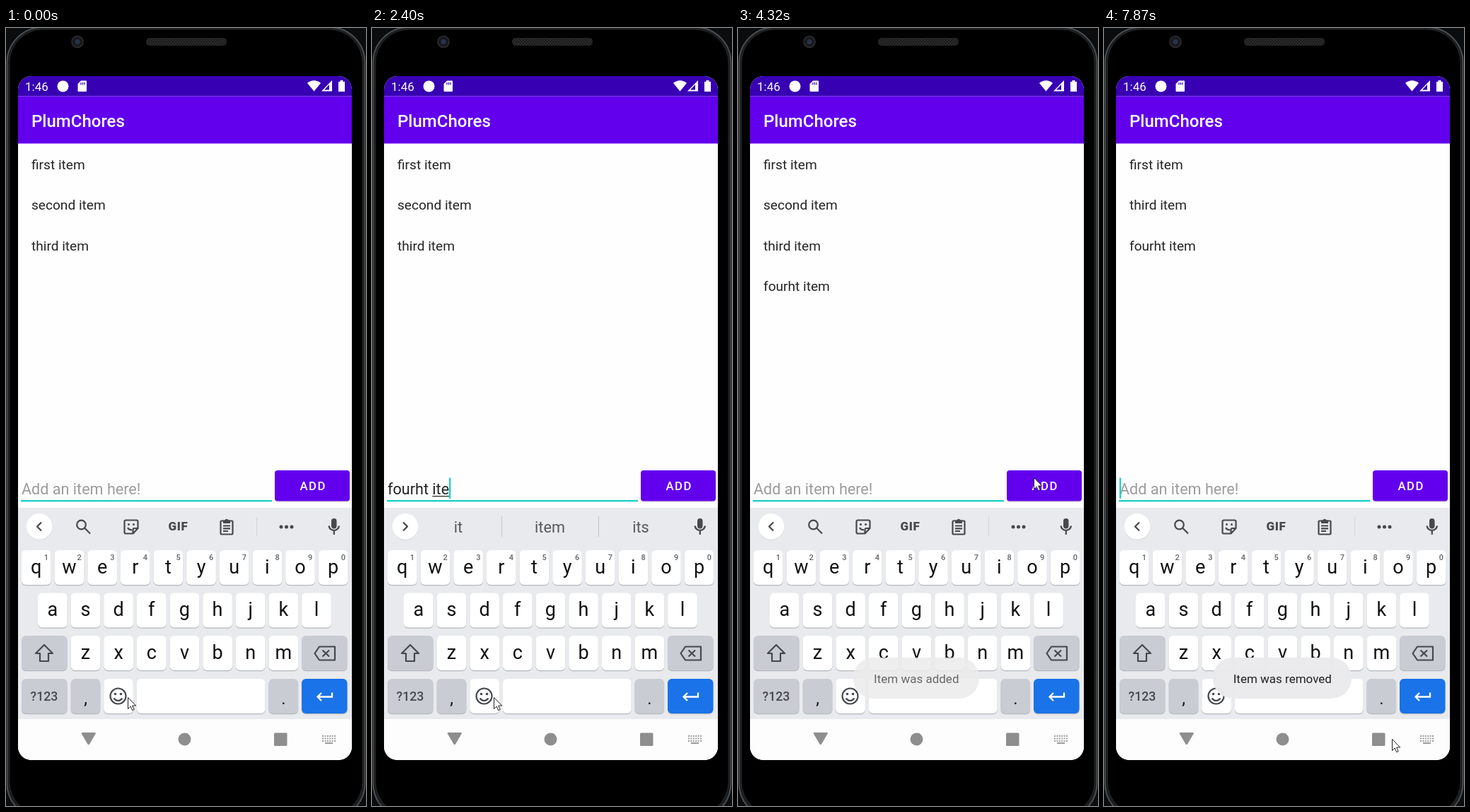
Recreate the animation shown at these times as an HTML page. Size 509 by 1101 pixels, loop 8 s.

```html
<!DOCTYPE html>
<html lang="en">
<head>
<meta charset="utf-8">
<title>To-do list</title>
<style>
  html, body { margin: 0; width: 100%; height: 100%; overflow: hidden; background: #000; }
  svg { display: block; width: 509px; height: 1101px; }
  text { font-family: Roboto, "Noto Sans", sans-serif; white-space: pre; }
  .mid { text-anchor: middle; }
  .row { font-size: 19.1px; fill: #242424; }
  .field { font-size: 21.6px; fill: #242424; }
  .hint { font-size: 21.6px; fill: #9c9c9c; }
  .key { font-size: 27px; fill: #111; }
  .sup { font-size: 11px; font-weight: 500; fill: #62656a; }
  .sug { font-size: 21.7px; fill: #55585c; }
  .msg { font-size: 17px; fill: #202124; }
  .line { fill: none; stroke: #45484c; stroke-width: 2.2; stroke-linejoin: round; }
  .solid { fill: #45484c; }
  .nav { fill: #8e8e8e; }
</style>
</head>
<body>
<svg viewBox="0 0 509 1101" xmlns="http://www.w3.org/2000/svg">
  <defs>
    <clipPath id="screen"><rect x="17" y="68" width="472" height="968" rx="19"/></clipPath>
    <pattern id="mesh" width="4" height="4" patternUnits="userSpaceOnUse">
      <rect width="4" height="4" fill="#2b2b2b"/><path d="M0 0L4 4M4 0L0 4" stroke="#1c1c1c"/>
    </pattern>
  </defs>

  <!-- phone body -->
  <rect width="509" height="1101" fill="#0b0c0d"/>
  <rect x="1.5" y="-1" width="506" height="1120" rx="50" fill="#1b1d1f" stroke="#4a4d50" stroke-width="2"/>
  <rect x="5" y="2" width="499" height="1112" rx="47" fill="#000" stroke="#26282a"/>
  <circle cx="101" cy="19.500" r="8" fill="#17191c" stroke="#2e3033" stroke-width="1.500"/>
  <circle cx="101" cy="19.500" r="3.500" fill="#26324c"/>
  <rect x="198" y="14" width="114" height="11" rx="5" fill="url(#mesh)"/>

  <g clip-path="url(#screen)">
    <rect x="17" y="68" width="472" height="968" fill="#fefefe"/>
    <rect x="17" y="68" width="472" height="28.500" fill="#3700b3"/>
    <rect x="17" y="96.500" width="472" height="67" fill="#6200ee"/>

    <!-- status bar -->
    <g fill="#fff">
      <text x="27" y="88.500" font-size="17">1:46</text>
      <circle cx="80.500" cy="82.500" r="8"/>
      <path d="M106 74.500H113Q114 74.500 114 75.500V89Q114 90 113 90H102.500Q101.500 90 101.500 89V79Z"/>
      <path d="M426 78Q435.500 70.500 445 78L435.500 89.500Z"/>
      <path d="M461 74V89.500H446Z"/>
      <path d="M472.500 74H476.500V76H479V90H470V76H472.500Z"/>
    </g>
    <path d="M106 77V80.500M108.500 77V80.500M111 77V80.500" stroke="#3700b3" stroke-width="1.200"/>
    <path d="M457 80V87.500H450Z" fill="#3700b3"/>
    <text x="36" y="139.500" font-size="24" font-weight="500" fill="#fff">PlumChores</text>

    <g id="rows"></g>

    <!-- entry field -->
    <text id="hint" class="hint" x="22" y="660">Add an item here!</text>
    <text id="field" class="field" x="22" y="660"></text>
    <rect id="under" y="662" height="1.200" fill="#242424"/>
    <rect x="21" y="668" width="355" height="2.400" fill="#1fd2c4"/>
    <rect id="caret" y="636.500" width="2.400" height="29.500" fill="#1fd2c4"/>
    <rect x="380" y="627.500" width="106" height="43.500" rx="4" fill="#bbb" opacity=".5"/>
    <rect x="380" y="626" width="106" height="43.500" rx="4" fill="#6200ee"/>
    <text x="415.500" y="654" font-size="16.700" font-weight="500" letter-spacing="1.500" fill="#fff">ADD</text>

    <!-- keyboard -->
    <rect x="17" y="679" width="472" height="299" fill="#e8eaed"/>
    <circle cx="47" cy="706.500" r="18.300" fill="#c9cbcf" opacity=".6"/>
    <circle cx="47" cy="705.500" r="18.300" fill="#fff"/>
    <path id="chevron" class="line"/>

    <g id="tools">
      <circle class="line" cx="106.500" cy="703" r="6.300"/>
      <path class="line" d="M111 707.500L119 715.500" stroke-width="3"/>
      <path class="line" d="M169.500 696.500H184.500Q186.500 696.500 186.500 698.500V708L179.500 715.500H169.500Q167.500 715.500 167.500 713.500V698.500Q167.500 696.500 169.500 696.500ZM186 708H181.500Q179.500 708 179.500 710V715M172 707Q174 711 178 710"/>
      <circle class="solid" cx="173.500" cy="702.500" r="1.500"/>
      <circle class="solid" cx="180.500" cy="702.500" r="1.500"/>
      <text class="mid solid" x="243.500" y="711" font-size="17" font-weight="900" letter-spacing=".600">GIF</text>
      <path class="line" d="M304.500 697.500H319.500Q320.500 697.500 320.500 698.500V715.500Q320.500 716.500 319.500 716.500H304.500Q303.500 716.500 303.500 715.500V698.500Q303.500 697.500 304.500 697.500ZM307 704.500H317M307 708.300H317M307 712H314"/>
      <path class="solid" d="M307 696.500H309.500A2.700 2.700 0 0 1 314.500 696.500H317V701H307Z"/>
      <path d="M354.500 692V719" stroke="#d2d4d8"/>
      <circle class="solid" cx="389" cy="706" r="2.500"/>
      <circle class="solid" cx="396.500" cy="706" r="2.500"/>
      <circle class="solid" cx="404" cy="706" r="2.500"/>
    </g>
    <g id="sugs">
      <text class="sug mid" x="122" y="714"></text>
      <text class="sug mid" x="251.500" y="714"></text>
      <text class="sug mid" x="380" y="714"></text>
      <path d="M183.500 691V720M320.500 691V720" stroke="#c6c8cc"/>
    </g>
    <rect class="solid" x="460" y="694" width="7.500" height="14.500" rx="3.700"/>
    <path class="line" d="M456.500 704.500A7.300 7.300 0 0 0 471 704.500M463.800 712V717"/>

    <g id="keys"></g>
    <path class="line" d="M54 873L66 885H60V896H48V885H42Z"/>
    <path class="line" d="M443 875.500H465V894.500H443L436.500 885ZM447.500 880.500L457 889.500M457 880.500L447.500 889.500"/>
    <circle class="line" cx="158.500" cy="945.500" r="11"/>
    <circle class="solid" cx="154.500" cy="942.500" r="1.800"/>
    <circle class="solid" cx="162.500" cy="942.500" r="1.800"/>
    <path class="line" d="M152.500 948.500Q158.500 955.500 164.500 948.500"/>
    <path d="M461 940.500V946.500H441M446 941L440.500 946.500L446 952" fill="none" stroke="#fff" stroke-width="2.300"/>

    <!-- navigation bar -->
    <rect x="17" y="978" width="472" height="58" fill="#fdfdfd"/>
    <path class="nav" d="M107.500 997H126Q127.500 997.500 126.500 999L118 1013.500Q116.700 1015 115.500 1013.500L107 999Q106 997.500 107.500 997Z"/>
    <circle class="nav" cx="252.500" cy="1006.500" r="9"/>
    <rect class="nav" x="379" y="997.500" width="18.500" height="18.500" rx="1.500"/>
    <path d="M447 1002H466M447 1005.500H466M447 1009H466" stroke="#9b9b9b" stroke-width="2" stroke-dasharray="2 1.400"/>
    <path d="M451 1012H462" stroke="#9b9b9b" stroke-width="1.800"/>

    <g id="toast">
      <rect y="891" height="58" rx="28" fill="#ebebed"/>
      <text class="msg mid" x="252.300" y="926.500"></text>
    </g>
  </g>
  <path id="mouse" d="M.5 .5V16.500L4.200 13L6.700 18.700L9.200 17.600L6.700 12H11.700Z" fill="#fff" stroke="#222" stroke-width="1"/>
</svg>

<script>
const LOOP = 8000;
const $ = id => document.getElementById(id);
const clamp = v => Math.max(0, Math.min(1, v));
const ramp = (t, from, to) => clamp((t - from) / (to - from));
const ease = p => p * p * (3 - 2 * p);

function add(parent, tag, attrs, content = "") {
  const el = document.createElementNS("http://www.w3.org/2000/svg", tag);
  for (const name in attrs) el.setAttribute(name, attrs[name]);
  el.textContent = content;
  parent.append(el);
  return el;
}
const set = (el, name, value) => el.setAttribute(name, value);
const show = (el, on) => set(el, "visibility", on ? "visible" : "hidden");

// Keyboard
const PITCH = 46.65, GREY = "#c9ccd3";
function key(x, y, w, fill = "#fff") {
  add($("keys"), "rect", { x, y: y + 1.3, width: w, height: 49, rx: 6, fill: "#b5b8bd" });
  add($("keys"), "rect", { x, y, width: w, height: 49, rx: 6, fill });
}
const label = (x, y, cls, s) => add($("keys"), "text", { x, y, class: cls }, s);
[["qwertyuiop", 22, 739], ["asdfghjkl", 45, 799.5], ["zxcvbnm", 91.7, 860]].forEach(([letters, x0, y]) => {
  [...letters].forEach((c, i) => {
    const x = x0 + i * PITCH;
    key(x, y, 41.6);
    label(x + 20.8, y + 32.5, "key mid", c);
    if (y === 739) label(x + 35, y + 13.5, "sup mid", (i + 1) % 10);
  });
});
key(22, 860, 64.5, GREY);
key(418, 860, 64.5, GREY);
key(22, 921, 64.5, GREY);
key(91.7, 921, 41.6, GREY);
key(138.3, 921, 41.6);
key(185, 921, 181.5);
key(371.5, 921, 41.6, GREY);
key(418, 921, 64.5, "#1a73e8");
set(label(54, 952, "mid solid", "?123"), "style", "font-size:17.7px;font-weight:500");
label(112.5, 957, "key mid", ",").style.fontSize = "24px";
label(392.3, 957, "key mid", ".").style.fontSize = "24px";

// List
const ROW = 57.5;
const rows = ["first item", "second item", "third item", "fourht item"].map((s, i) =>
  add($("rows"), "text", { class: "row", x: 36, y: 199.5 + i * ROW }, s));

// Bursts of activity: start, end, number of picture changes
const bursts = [
  [120, 390, 3], [700, 1700, 8], [2130, 2670, 5], [2940, 3480, 5],
  [3750, 4740, 8], [4860, 5870, 9], [6020, 7000, 8], [7240, 7870, 5]
];
function snap(t) {
  const burst = bursts.filter(b => b[0] <= t).pop();
  if (!burst) return 0;
  const [start, end, n] = burst, step = (end - start) / (n - 1);
  return start + step * Math.min(n - 1, Math.floor((t - start) / step + 0.01));
}

// time, text, word being composed
const typing = [
  [0, "", ""], [120, "f", "f"], [380, "fo", "fo"], [700, "fou", "fou"], [830, "four", "four"],
  [1110, "fourh", "fourh"], [1260, "fourht", "fourht"], [1400, "fourht ", "fourht"],
  [1690, "fourht ", ""], [2130, "fourht i", "i"], [2260, "fourht it", "it"],
  [2390, "fourht ite", "ite"], [2530, "fourht item", "item"], [3750, "", ""]
];
const hints = [
  [0, ""], [250, "f|for|from"], [690, "fo|for|four"], [970, "four|fourth|fours"],
  [1250, "fourh|four-handed|fourth"], [1690, "the|item|and"], [2250, "it|I|is"],
  [2390, "it|item|its"], [2660, "item|it|items"], [2930, "item|items|itemized"], [3880, ""]
];
const toasts = [[4100, 4430, 6020, 6290, "Item was added", 178], [6700, 7000, 9000, 9300, "Item was removed", 196]];
const path = [
  [0, 172, 947], [2940, 172, 947], [3480, 418, 636], [4450, 418, 636], [4740, 271, 424],
  [5360, 137, 242], [5500, 137, 242], [5750, 131, 246], [7200, 131, 246], [7870, 407, 1006]
];
const latest = (list, t) => list.filter(e => e[0] <= t).pop();

function mouseAt(t) {
  const i = path.findIndex(p => p[0] > t);
  if (i < 0) return path[path.length - 1].slice(1);
  const [t0, x0, y0] = path[i - 1], [t1, x1, y1] = path[i];
  const p = ease(ramp(t, t0, t1));
  return [x0 + (x1 - x0) * p, y0 + (y1 - y0) * p];
}

function caretOn(t) {
  if (t < 120) return false;
  if (t < 3000) return true;
  if (t < 3750) return t < 3200;
  const phase = t % 1000;
  return phase >= 650 || phase < 150;
}

function drawField(t) {
  const [, text, word] = latest(typing, t);
  const field = $("field");
  if (field.textContent !== text) field.textContent = text;
  show($("hint"), !text);
  const width = text ? field.getComputedTextLength() : 0;
  set($("caret"), "x", 21.8 + width);
  show($("caret"), caretOn(t));
  const at = text.lastIndexOf(word);
  show($("under"), word);
  if (word) {
    set($("under"), "x", 22 + (at ? field.getSubStringLength(0, at) : 0));
    set($("under"), "width", field.getSubStringLength(at, word.length));
  }
}

function drawBar(t) {
  const words = latest(hints, t)[1];
  show($("tools"), !words);
  show($("sugs"), words);
  const parts = words.split("|");
  $("sugs").querySelectorAll("text").forEach((el, i) => el.textContent = parts[i] || "");
  set($("chevron"), "d", words ? "M44 699.500L50 705.500L44 711.500" : "M50 699.500L44 705.500L50 711.500");
}

function drawToast(t) {
  const [inA, inB, outA, outB, text, width] = latest(toasts, t) || toasts[0];
  const alpha = ramp(t, inA, inB) * (1 - ramp(t, outA, outB));
  const [box, msg] = $("toast").children;
  set(box, "x", 252 - width / 2);
  set(box, "width", width);
  set(box, "opacity", 0.97 * (1 - (1 - alpha) ** 2));
  set(msg, "opacity", alpha);
  msg.textContent = text;
}

function draw(t) {
  drawField(t);
  drawBar(t);
  drawToast(t);
  set(rows[1], "opacity", 1 - ramp(t, 6230, 6430));
  const lift = ROW * ease(ramp(t, 6600, 6850));
  [2, 3].forEach(i => set(rows[i], "y", 199.5 + i * ROW - lift));
  show(rows[3], t >= 3750);
  set($("mouse"), "transform", `translate(${mouseAt(t).map(Math.round)})`);
}

function tick() {
  draw(snap(performance.now() % LOOP));
  requestAnimationFrame(tick);
}
tick();
</script>
</body>
</html>
```
